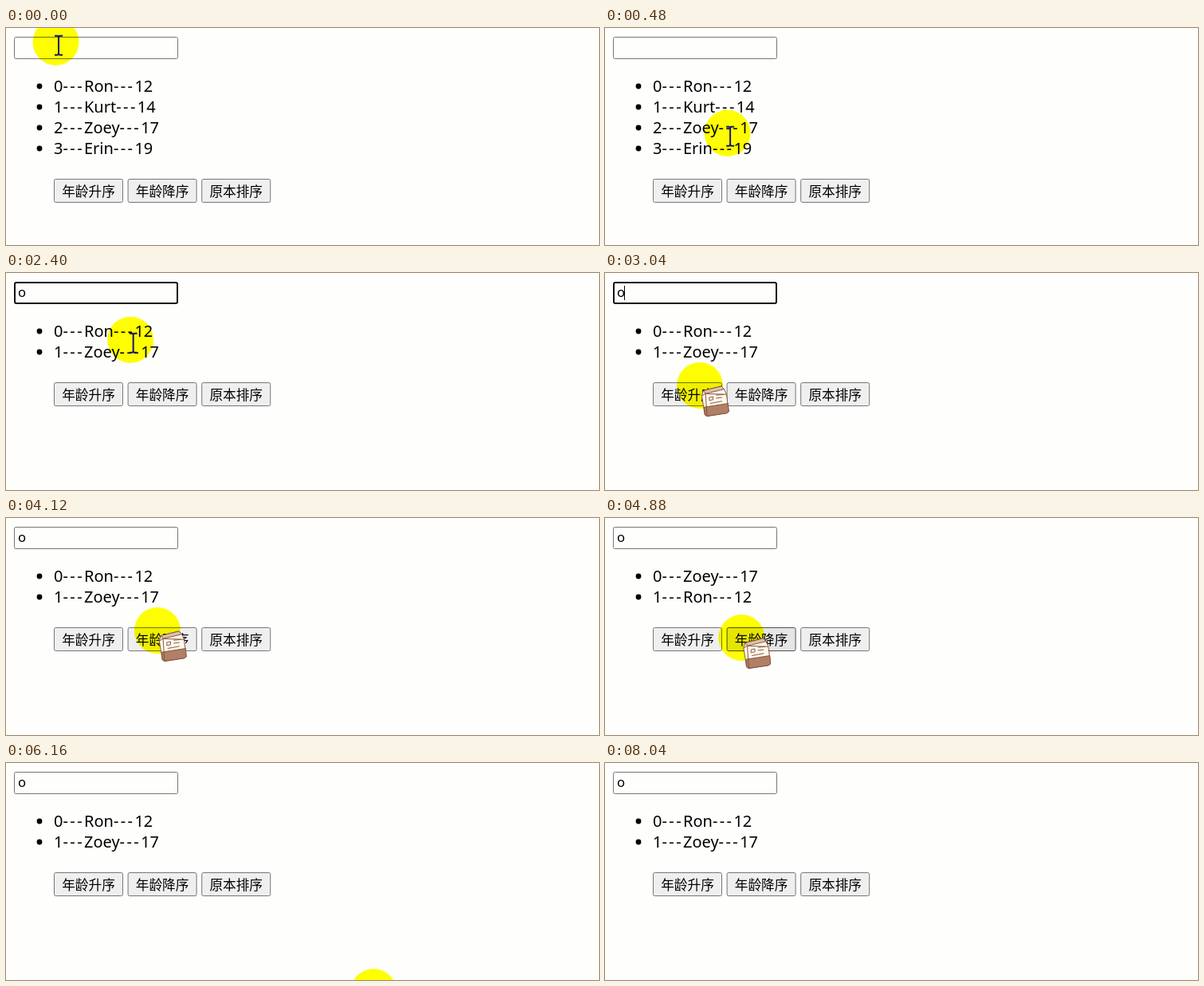
These frames come from a looping animation (744 px wide and 272 px high, 8.08 s). An HTML page:

```html
<!DOCTYPE html>
<html lang="zh">
<head>
<meta charset="utf-8">
<title>Filter and sort</title>
<style>
  html, body { margin: 0; width: 100%; height: 100%; overflow: hidden; background: #fefefd; }
  svg { display: block; width: 744px; height: 272px; }
  .row { font: 20px "Noto Sans", sans-serif; }
  .dash { letter-spacing: 2.4px; }
  .typed { font: 16.67px "Noto Sans", sans-serif; }
  .label { font: 16.67px "Noto Sans CJK SC", "Noto Sans CJK", sans-serif; text-anchor: middle; }
  .button rect { fill: #efefef; stroke: #767676; }
  .button.hover rect { fill: #e5e5e5; stroke: #4f4f4f; }
  .button.press rect { fill: #f5f5f5; }
  #box { fill: #fefefd; stroke: #767676; }
  #box.focus { stroke: #101010; stroke-width: 2; }
  #spot { fill: #ff0; mix-blend-mode: multiply; }
</style>
</head>
<body>
<svg viewBox="0 0 744 272">
  <rect id="box" rx="2"/>
  <text id="typed" class="typed" x="15" y="30"></text>
  <rect id="caret" y="16" width="1" height="18"/>
  <g id="list"></g>
  <g id="buttons"></g>
  <circle id="spot" r="29"/>
  <path id="beam" d="M-5-12h3q2 0 2 2q0-2 2-2h3M0-10V10M-5 12h3q2 0 2-2q0 2 2 2h3"
        fill="none" stroke="#17176e" stroke-width="2"/>
  <g id="carton"><g transform="scale(.94)" stroke="#80503c" stroke-linejoin="round">
    <path d="M3 8L27 2L31 6L34 13L37 36L34 38L8 42L5 40L1 15Z" fill="#fff8ea"/>
    <path d="M4 30L36 25L37 36L34 38L8 42L5 40Z" fill="#b07f66"/>
    <path d="M3 8L27 2L31 6L6 12Z" fill="#dfc0a8"/>
    <path d="M1 15L6 12L34 13M6 12L8 42M11 17l5-1v4l-5 1zM20 14l10-1M20 18l8-1M12 25l16-3" fill="none"/>
  </g></g>
</svg>
<script>
const LOOP = 8080;
const people = [['Ron', 12], ['Kurt', 14], ['Zoey', 17], ['Erin', 19]];
const labels = ['年龄升序', '年龄降序', '原本排序'];

const FOCUS = 1040, TYPE = 1880, BLUR = 3400, DESC = 4600, RESET = 5600;
const PRESS = 120;
const clicks = [BLUR, DESC - PRESS, RESET - PRESS];

// Pointer moves: when, how far to bow off the straight line
const home = { x: 62, y: 17 };
const moves = [
  { from: 0, to: 1080, x: 104, y: 33, bow: [76, 126] },
  { from: 2280, to: 3040, x: 119, y: 141, bow: [60, 24] },
  { from: 3880, to: 4120, x: 190, y: 141 },
  { from: 4120, to: 4680, x: 171, y: 150 },
  { from: 4880, to: 5360, x: 275, y: 156 },
  { from: 5720, to: 6480, x: 501, y: 315 },
  { from: 6900, to: 7240, x: 509, y: 286 },
  { from: 8000, to: 8040, x: 509, y: 340 }
];

const $ = id => document.getElementById(id);
const within = (t, a, b) => t >= a && t < b;
const show = (el, on) => el.style.display = on ? '' : 'none';
const move = (el, x, y) => el.setAttribute('transform', `translate(${x} ${y})`);
const easeOut = u => u * (2 - u);

function set(el, attrs) {
  for (const k in attrs) el.setAttribute(k, attrs[k]);
}

$('buttons').innerHTML = labels.map((label, i) =>
  `<g class="button" transform="translate(${60 + i * 92.6} 0)">
    <rect x=".5" y=".5" width="86" height="29" rx="2"/>
    <text class="label" x="43.5" y="21.5">${label}</text></g>`).join('');
const buttons = [...$('buttons').children];

function rowsAt(t) {
  const query = t >= TYPE ? 'o' : '';
  const rows = people.filter(p => p[0].includes(query));
  return within(t, DESC, RESET) ? rows.sort((a, b) => b[1] - a[1]) : rows;
}

let drawn = '';
function drawList(rows) {
  const dash = '<tspan class="dash">---</tspan>';
  const html = rows.map(([name, age], i) =>
    `<circle cx="42" cy="${73 + i * 26}" r="3.4"/>
     <text class="row" x="60" y="${80 + i * 26}">${i}${dash}${name}${dash}${age}</text>`).join('');
  if (html !== drawn) $('list').innerHTML = drawn = html;
}

function pointerAt(t) {
  let { x, y } = home;
  for (const m of moves) {
    if (t < m.from) break;
    const e = easeOut(Math.min(1, (t - m.from) / (m.to - m.from)));
    const [bx, by] = m.bow || [0, 0], s = Math.sin(Math.PI * e);
    x += (m.x - x) * e + bx * s;
    y += (m.y - y) * e + by * s;
  }
  return [x, y];
}

function drawInput(t) {
  const focus = within(t, FOCUS, BLUR), typed = t >= TYPE;
  const inset = focus ? 1 : .5;
  $('box').setAttribute('class', focus ? 'focus' : '');
  set($('box'), { x: 10 + inset, y: 11 + inset, width: 206 - 2 * inset, height: 28 - 2 * inset });
  $('typed').textContent = typed ? 'o' : '';
  show($('caret'), focus && (t - (typed ? TYPE : FOCUS)) % 1000 < 500);
  $('caret').setAttribute('x', typed ? 24 : 15);
}

function drawPointer(t, count) {
  const [x, y] = pointerAt(t);
  const px = x + 3.5, py = y + 4;
  const onInput = py < 40 && px > 10 && px < 216;
  const onText = px > 60 && px < 190 && py > 60 && py < 60 + count * 26;
  move($('spot'), x, y);
  move($('beam'), px, py);
  move($('carton'), x + 1.5, y - 1);
  show($('beam'), onInput || onText);
  show($('carton'), !onInput && !onText);
}

function draw(t) {
  const rows = rowsAt(t);
  drawInput(t);
  drawList(rows);
  move($('buttons'), 0, 85 + rows.length * 26);
  buttons.forEach((b, i) => {
    b.classList.toggle('hover', within(t, clicks[i] - 300, clicks[i] + 500));
    b.classList.toggle('press', within(t, clicks[i], clicks[i] + PRESS));
  });
  drawPointer(t, rows.length);
}

const start = performance.now();
function tick() {
  draw((performance.now() - start) % LOOP);
  requestAnimationFrame(tick);
}
tick();
</script>
</body>
</html>
```
